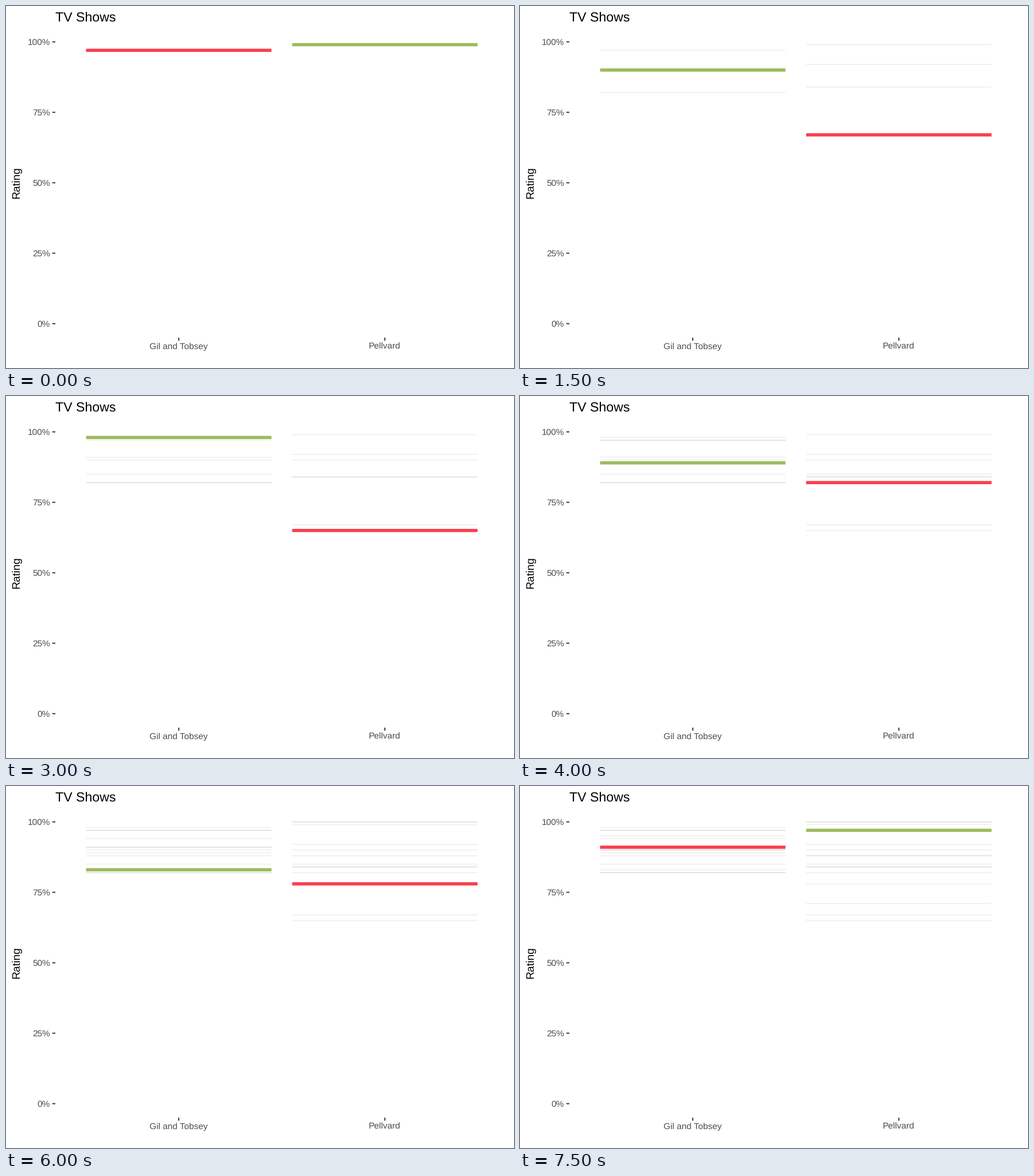
A matplotlib script that plays this animation: 885 px wide and 632 px high, repeating every 8 s.

```python
import matplotlib.pyplot as plt
from matplotlib.animation import FuncAnimation
from matplotlib.collections import LineCollection

plt.rcParams["font.family"] = "Liberation Sans"
plt.rcParams["text.hinting"] = "none"

W, H, DPI = 885, 632, 100
PX = 72 / DPI  # points per pixel
HIGH, LOW = "#9BBB5B", "#FA3E4E"
TICK, LABEL = "#333333", "#4D4D4D"
LEFT, BOTTOM, TICK_LEN = 86, 579, 5.4

SHOWS = ["Gil and Tobsey", "Pellvard"]
CENTERS = [301, 660]
HALF = 161.5
RATINGS = [
    (97, 99), (82, 84), (91, 92), (90, 67),
    (82, 90), (85, 84), (98, 65), (97, 85),
    (89, 82), (88, 100), (94, 88), (91, 100),
    (83, 78), (90, 88), (95, 71), (91, 97),
]


def y_of(rating):
    return 62.6 + (100 - rating) * 4.92


def segments(pair):
    return [[(cx - HALF, y_of(r)), (cx + HALF, y_of(r))]
            for cx, r in zip(CENTERS, pair)]


def write(x, y, text, size, color="black", **kw):
    ax.text(x, y, text, fontsize=size * PX, color=color, va="baseline", **kw)


def tick(xs, ys):
    ax.plot(xs, ys, color=TICK, lw=1.87 * PX, solid_capstyle="butt",
            snap=False)


fig = plt.figure(figsize=(W / DPI, H / DPI), dpi=DPI, facecolor="white")
ax = fig.add_axes([0, 0, 1, 1])
ax.axis("off")

write(LEFT, 26.8, "TV Shows", 23.1)
write(23.7, 308.6, "Rating", 19.25, ha="center", rotation=90,
      rotation_mode="anchor")

for r in range(0, 101, 25):
    y = y_of(r)
    tick([LEFT - TICK_LEN, LEFT], [y, y])
    write(77, y + 5.6, f"{r}%", 15.4, LABEL, ha="right")

for cx, show in zip(CENTERS, SHOWS):
    tick([cx, cx], [BOTTOM, BOTTOM + TICK_LEN])
    write(cx, 599.2, show, 15.4, LABEL, ha="center")

# Past ratings overlap, so repeated values grow darker.
past = LineCollection([], colors=[(0, 0, 0, 0.06)], linewidths=1.87 * PX,
                      snap=False, zorder=3)
now = LineCollection([], linewidths=5.6 * PX, snap=False, zorder=4)
ax.add_collection(past)
ax.add_collection(now)
ax.set_xlim(0, W)
ax.set_ylim(H, 0)


def update(i):
    past.set_segments([s for pair in RATINGS[:i] for s in segments(pair)])
    a, b = RATINGS[i]
    now.set_segments(segments((a, b)))
    now.set_color([HIGH, LOW] if a > b else [LOW, HIGH])
    return past, now


anim = FuncAnimation(fig, update, frames=len(RATINGS), interval=500,
                     repeat=True, repeat_delay=0)
plt.show()
```
